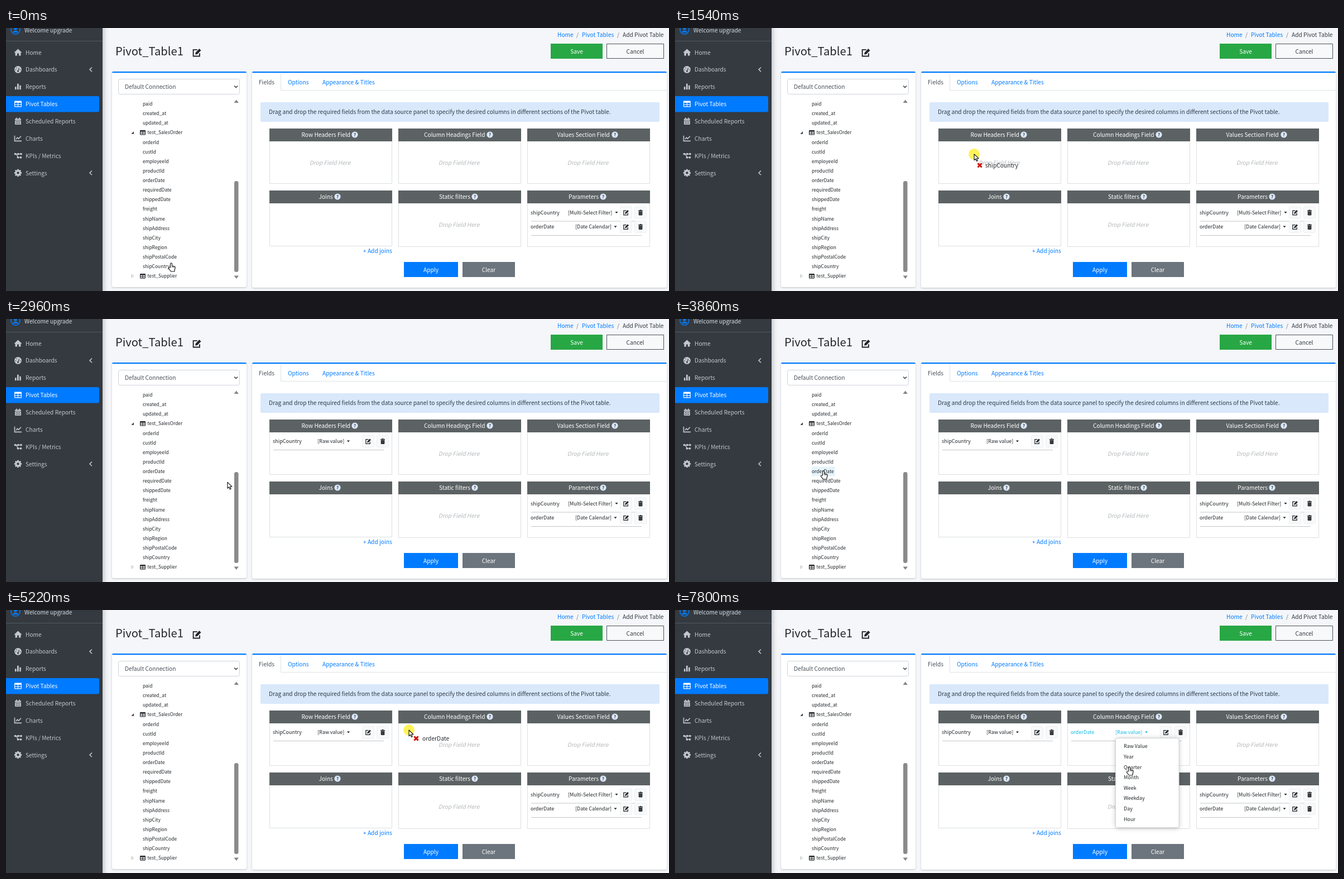
Recreate the animation shown at these times as an HTML page with a canvas. Size 1188x471 px, loop 8 s.

```html
<!DOCTYPE html>
<html lang="en">
<head>
<meta charset="utf-8">
<title>Pivot table builder</title>
<style>
html, body { margin: 0; width: 100%; height: 100%; overflow: hidden; background: #f4f6f9; }
canvas { display: block; }
</style>
</head>
<body>
<canvas id="stage" width="1188" height="471"></canvas>
<script>
const ctx = document.getElementById('stage').getContext('2d');
const LOOP = 8000;
const FAMILY = '"Noto Sans CJK SC", "Noto Sans CJK JP", "Noto Sans CJK", "Noto Sans", sans-serif';
const BODY = 10.18, SMALL = 8.95, TREE = 8.45;
const BLUE = '#007bff', INK = '#212529', CYAN = '#17b8e0';

// Pointer path: time, x, y of the tip
const PATH = [
  [0, 296, 421], [50, 296, 421], [210, 290, 428], [500, 290, 426], [1340, 524, 242],
  [1540, 536, 226], [1680, 546, 217], [1900, 546, 217], [2290, 554, 231], [2700, 463, 285],
  [3440, 312, 291], [3530, 312, 291], [3860, 266, 272], [4010, 266, 272], [4800, 688, 225],
  [5220, 722, 215], [5370, 722, 215], [6190, 842, 224], [6390, 844, 223], [7200, 844, 223],
  [7800, 814, 281], [8000, 814, 281]
];
const DRAGS = [
  { from: 550, to: 1950, name: 'shipCountry', icon: [10, 20], label: [20, 20] },
  { from: 4060, to: 5420, name: 'orderDate', icon: [13, 15], label: [24, 15] }
];
const CLICK = 6660, MENU_OPEN = 6785;
const TREE_ROWS = ['paid', 'created_at', 'updated_at', '>test_SalesOrder', 'orderId', 'custId',
  'employeeId', 'productId', 'orderDate', 'requiredDate', 'shippedDate', 'freight', 'shipName',
  'shipAddress', 'shipCity', 'shipRegion', 'shipPostalCode', 'shipCountry', '>test_Supplier'];
const treeY = i => 136 + i * 17.12;

function rect(x, y, w, h, fill, stroke, r = 0) {
  ctx.beginPath();
  ctx.roundRect(x, y, w, h, r);
  if (fill) { ctx.fillStyle = fill; ctx.fill(); }
  if (stroke) { ctx.strokeStyle = stroke; ctx.lineWidth = 1; ctx.stroke(); }
}
function line(color, width, ...pts) {
  ctx.beginPath();
  pts.forEach(([x, y]) => ctx.lineTo(x, y));
  ctx.strokeStyle = color;
  ctx.lineWidth = width;
  ctx.stroke();
}
function poly(color, ...pts) {
  ctx.beginPath();
  pts.forEach(([x, y]) => ctx.lineTo(x, y));
  ctx.closePath();
  ctx.fillStyle = color;
  ctx.fill();
}
function disc(x, y, r, fill) {
  ctx.beginPath();
  ctx.arc(x, y, r, 0, 7);
  ctx.fillStyle = fill;
  ctx.fill();
}
function ring(x, y, r, color, width) {
  ctx.beginPath();
  ctx.arc(x, y, r, 0, 7);
  ctx.strokeStyle = color;
  ctx.lineWidth = width;
  ctx.stroke();
}
// y is the middle of the capitals
function text(str, x, y, color = INK, size = BODY, align = 'left', style = '') {
  ctx.font = `${style} ${size}px ${FAMILY}`;
  ctx.textAlign = align;
  ctx.fillStyle = color;
  ctx.fillText(str, x, y + size * 0.37);
}
function at(x, y, scale, draw) {
  ctx.save();
  ctx.translate(x, y);
  ctx.scale(scale, scale);
  draw();
  ctx.restore();
}
function withShadow(blur, alpha, draw) {
  ctx.save();
  ctx.shadowColor = `rgba(0,0,0,${alpha})`;
  ctx.shadowBlur = blur;
  ctx.shadowOffsetY = 1;
  draw();
  ctx.restore();
}

function editIcon(x, y, s = 1) {
  at(x, y, s, () => {
    line(INK, 1.3, [0.5, -3.5], [-4.4, -3.5], [-4.4, 4.5], [3.4, 4.5], [3.4, 0.8]);
    poly(INK, [-2, 2.4], [-1.6, 0], [3, -4.8], [5.2, -2.6], [0.5, 2]);
  });
}
function trashIcon(x, y) {
  rect(x - 4, y - 4, 8, 1.4, INK);
  rect(x - 1.5, y - 5, 3, 1.4, INK);
  rect(x - 3.3, y - 2, 6.6, 7, INK, null, [0, 0, 1, 1]);
  for (const dx of [-1.5, 0, 1.5]) line('#777', 0.5, [x + dx, y - 1], [x + dx, y + 4]);
}
function tableIcon(x, y, w, h, color, hole) {
  rect(x - w / 2, y - h / 2, w, h, color, null, 1);
  const cw = w / 2 - 1.6, ch = h / 3 - 1;
  for (const cx of [x - w / 2 + 1.1, x + 0.5])
    for (const cy of [y - h / 2 + h * 0.3, y - h / 2 + h * 0.64]) rect(cx, cy, cw, ch, hole);
}
function caret(x, y, color) {
  poly(color, [x - 2.6, y - 1.4], [x + 2.6, y - 1.4], [x, y + 1.5]);
}

const navIcons = [
  c => { poly(c, [-7, 0.6], [0, -6], [7, 0.6], [5, 0.8], [5, 6], [1.5, 6], [1.5, 2], [-1.5, 2], [-1.5, 6], [-5, 6], [-5, 0.8]); },
  c => {
    disc(0, 0, 6.4, c);
    line('#343a40', 1.2, [0, 2.5], [2.2, -3]);
    disc(0, 3, 1.5, '#343a40');
    [[-4, 0.5], [-2.6, -3], [4, 0.5]].forEach(([x, y]) => disc(x, y, 0.8, '#343a40'));
  },
  c => { rect(-5.5, 0, 2.6, 5, c); rect(-1.5, -5.5, 2.8, 10.5, c); rect(2.7, -2.5, 2.6, 7.5, c); },
  c => tableIcon(0, 0, 13, 11, c, BLUE),
  c => {
    rect(-5.5, -4.5, 11, 2.4, c);
    rect(-3.5, -6.3, 1.7, 2.5, c);
    rect(1.8, -6.3, 1.7, 2.5, c);
    rect(-5.5, -1.3, 11, 7.5, c, null, 1);
    for (const x of [-3.8, -0.8, 2.2]) for (const y of [0.2, 3.1]) rect(x, y, 1.6, 1.6, '#343a40');
  },
  c => { line(c, 1.6, [-6, -5], [-6, 4.6], [6.5, 4.6]); line(c, 1.6, [-3.5, 1.5], [-1, -1.5], [1, 0.5], [5.5, -4]); },
  c => {
    line(c, 1.3, [-6, -3], [6, -3]);
    line(c, 1.3, [-3, -3], [0, 3], [5, 3]);
    [[-5, -3], [0.5, -3], [5.5, -3], [0, 3.2], [5, 3.2]].forEach(([x, y]) => disc(x, y, 1.9, c));
  },
  c => {
    for (let i = 0; i < 8; i++) {
      const a = i * Math.PI / 4;
      line(c, 3, [0, 0], [6.6 * Math.cos(a), 6.6 * Math.sin(a)]);
    }
    disc(0, 0, 5, c);
    disc(0, 0, 2.1, '#343a40');
  }
];

function sidebar() {
  withShadow(10, 0.35, () => rect(0, -10, 173, 500, '#343a40'));
  ring(17, 3, 8, BLUE, 1.5);
  disc(17, 1, 2.8, BLUE);
  ctx.beginPath();
  ctx.ellipse(17, 8, 5, 3.2, 0, Math.PI, 0);
  ctx.fillStyle = BLUE;
  ctx.fill();
  text('Welcome upgrade', 33, 4, '#d3d8e0');
  line('#4f5962', 1, [0, 23.5], [173, 23.5]);
  rect(0, 122, 167, 28.5, BLUE, null, [0, 3, 3, 0]);
  ['Home', 'Dashboards', 'Reports', 'Pivot Tables', 'Scheduled Reports', 'Charts', 'KPIs / Metrics', 'Settings']
    .forEach((name, i) => {
      const y = 43.5 + i * 30.85, color = i === 3 ? '#fff' : '#c2c7d0';
      at(21.5, y, 1, () => navIcons[i](color));
      text(name, 35, y + 0.3, color);
      if (i === 1 || i === 7) line(color, 1.5, [154, y - 3.8], [150, y], [154, y + 3.8]);
    });
}

function topBar() {
  text('Home', 988, 12, BLUE);
  text('/', 1022, 12, '#6c757d');
  text('Pivot Tables', 1032, 12, BLUE);
  text('/', 1095, 12, '#6c757d');
  text('Add Pivot Table', 1105, 12, '#343a40');
  text('Pivot_Table1', 196, 42, INK, 20.2);
  editIcon(342, 44, 1.45);
  button('Save', 976, 28, 93, '#28a745');
  rect(1076.5, 28.5, 102, 26, '#f8f9fb', '#4b5056');
  text('Cancel', 1127.5, 42, '#343a40', BODY, 'center');
}
function button(label, x, y, w, fill) {
  rect(x, y, w, 27, fill);
  text(label, x + w / 2, y + 14, '#fff', BODY, 'center');
}
function card(x, y, w, h) {
  withShadow(3, 0.22, () => rect(x, y, w, h, '#fff', null, 3));
  rect(x, y, w, 2.2, BLUE, null, [3, 3, 0, 0]);
}

function treePanel(hover) {
  card(190, 78, 241, 386);
  rect(201.5, 91.5, 217, 27, '#fff', '#ced4da', 3);
  text('Default Connection', 213, 105, '#495057');
  line('#343a40', 1.5, [409, 103.5], [412, 106.5], [415, 103.5]);
  TREE_ROWS.forEach((row, i) => {
    const y = treeY(i);
    if (row[0] !== '>') {
      if (i === hover) rect(245, y - 8.5, treeWidth(row) + 2, 17, '#e5f3fa');
      text(row, 245, y, INK, TREE);
      return;
    }
    if (i < 10) poly('#333', [224.5, y + 2.5], [229, y + 2.5], [229, y - 2]);
    else line('#aaa', 0.8, [225, y - 2.6], [228.5, y], [225, y + 2.6], [225, y - 2.6]);
    tableIcon(245, y, 10, 8.5, INK, '#fff');
    text(row.slice(1), 253.5, y, INK, TREE);
  });
  poly('#858585', [408.5, 134], [417, 134], [412.7, 128.5]);
  poly('#858585', [408.5, 443.5], [417, 443.5], [412.7, 449]);
  rect(409, 274, 7.5, 163, '#8a8a8a', null, 3.5);
}
function treeWidth(row) {
  ctx.font = `${TREE}px ${FAMILY}`;
  return ctx.measureText(row).width;
}
function treeItemAt({ x, y }) {
  const i = Math.round((y - treeY(0)) / 17.12), row = TREE_ROWS[i];
  return row && row[0] !== '>' && x >= 245 && x <= 246 + treeWidth(row) ? i : -1;
}

function fieldBox(x, y, h, title, titleX, helpX, empty) {
  rect(x + 0.5, y + 0.5, 219, h, '#fff', '#dcdfe1');
  rect(x, y, 220, 23, '#5c6264');
  text(title, titleX, y + 11, '#fff');
  disc(helpX, y + 11, 5.6, '#dbe8fb');
  text('?', helpX, y + 11, '#343a40', 8, 'center', 'bold');
  if (empty) text('Drop Field Here', x + 108.5, y + 61.5, '#b4b7ba', BODY, 'center', 'italic');
}
function fieldRow(x, y, name, value, valueX, caretX, color = INK) {
  text(name, x + 6, y, color, 9.02);
  text(value, x + valueX, y, color, SMALL);
  caret(x + caretX, y, color);
  for (const dx of [177, 203]) rect(x + dx - 10.5, y - 10.5, 21, 21, '#f8f9fa', '#eceef0', 2);
  editIcon(x + 177, y, 0.95);
  trashIcon(x + 203, y);
  line('#c4c6c8', 1, [x + 7, y + 15.5], [x + 205, y + 15.5]);
}

function fieldsPanel(t, rows) {
  card(441, 78, 743, 387);
  line('#dee2e6', 1, [492.5, 82], [492.5, 111.5], [1184, 111.5]);
  text('Fields', 453, 97, '#495057');
  text('Options', 505, 97, BLUE);
  text('Appearance & Titles', 567, 97, BLUE);
  rect(456, 133, 715, 35, '#d9e8fb', null, 2);
  text('Drag and drop the required fields from the data source panel to specify the desired columns in different sections of the Pivot table.', 471, 150, '#2f3a48');
  fieldBox(472, 180, 98, 'Row Headers Field', 529.5, 625, !rows[0].shown);
  fieldBox(703, 180, 98, 'Column Headings Field', 749, 867, !rows[1].shown);
  fieldBox(934, 180, 98, 'Values Section Field', 987.5, 1091, true);
  fieldBox(472, 291, 99, 'Joins', 560.5, 594, false);
  fieldBox(703, 291, 100, 'Static filters', 776, 840, true);
  fieldBox(934, 291, 100, 'Parameters', 1008, 1070, false);
  fieldRow(934, 330.5, 'shipCountry', '[Multi-Select Filter]', 73, 160);
  fieldRow(934, 356, 'orderDate', '[Date Calendar]', 86, 158);
  for (const r of rows)
    if (r.shown) fieldRow(r.x, 219, r.name, '[Raw value]', 86, 141.5, r.hover ? CYAN : INK);
  text('+ Add joins', 640, 399.5, BLUE);
  button('Apply', 713, 419, 97, BLUE);
  button('Clear', 818, 419, 94, '#6c757d');
}

function tooltip(r) {
  const cx = r.x + 43.5;
  ctx.font = `${SMALL}px ${FAMILY}`;
  const w = ctx.measureText(r.name).width + 12;
  rect(cx - w / 2, 186.5, w, 21.5, '#0b0b0b', null, 3);
  poly('#0b0b0b', [cx - 4, 208], [cx + 4, 208], [cx, 212]);
  text(r.name, cx, 197, '#fff', SMALL, 'center');
}
function menu() {
  withShadow(8, 0.25, () => rect(789.5, 229.5, 113.5, 160, '#fff', null, 3));
  rect(789.5, 229.5, 113.5, 160, '#fff', '#cfd1d3', 3);
  ['Raw Value', 'Year', 'Quarter', 'Month', 'Week', 'Weekday', 'Day', 'Hour']
    .forEach((item, i) => text(item, 804, 244 + i * 18.6, INK, SMALL));
}

const HAND = new Path2D('M-1.5 8V1Q0-1 1.5 1V5L6 6Q7.5 6.5 7.2 8.5L6 12.5V15H-0.5L-4.5 9.8Q-5 8-3.2 8Z');
const ARROW = new Path2D('M0 0V10.8L2.6 8.5 4.4 12.6 6.2 11.8 4.5 7.8H8Z');
function pointer({ x, y }, shape) {
  at(x, y, 1, () => {
    ctx.lineJoin = 'round';
    ctx.lineWidth = 1.1;
    ctx.fillStyle = '#fff';
    ctx.strokeStyle = '#111';
    ctx.fill(shape);
    ctx.stroke(shape);
    if (shape === HAND) for (const fx of [1.5, 3.5, 5.3]) line('#111', 0.7, [fx, 5.5], [fx, 8]);
  });
}
function dragGhost(p, d) {
  const x = p.x + d.icon[0], y = p.y + d.icon[1];
  line('#d01712', 3, [x - 3.6, y - 3.6], [x + 3.6, y + 3.6]);
  line('#d01712', 3, [x + 3.6, y - 3.6], [x - 3.6, y + 3.6]);
  text(d.name, p.x + d.label[0], p.y + d.label[1], '#26292c', 10.25);
}

// Hermite curve through the path, at rest wherever two neighbours coincide
function tip(t) {
  let i = 0;
  while (i < PATH.length - 2 && t >= PATH[i + 1][0]) i++;
  const a = PATH[i], b = PATH[i + 1], span = b[0] - a[0], u = (t - a[0]) / span;
  const still = (p, q) => p[1] === q[1] && p[2] === q[2];
  const speed = (k, axis) => {
    const p = PATH[k - 1], q = PATH[k], r = PATH[k + 1];
    return !p || !r || still(p, q) || still(q, r) ? 0 : (r[axis] - p[axis]) / (r[0] - p[0]);
  };
  const mix = axis => {
    const s = u * u * (3 - 2 * u);
    return a[axis] + (b[axis] - a[axis]) * s +
      span * (speed(i, axis) * u * (1 - u) ** 2 - speed(i + 1, axis) * u * u * (1 - u));
  };
  return { x: mix(1), y: mix(2) };
}

function render(t) {
  const p = tip(t);
  const drag = DRAGS.find(d => t >= d.from && t < d.to);
  const menuOpen = t >= MENU_OPEN;
  const rows = [472, 703].map((x, i) => {
    const shown = t >= DRAGS[i].to;
    const over = shown && p.x >= x && p.x <= x + 206 && p.y >= 206 && p.y <= 234;
    return { x, name: DRAGS[i].name, shown, over, hover: over || (i === 1 && menuOpen) };
  });
  const item = drag ? -1 : treeItemAt(p);

  rect(0, 0, 1188, 471, '#f4f6f9');
  topBar();
  treePanel(item);
  fieldsPanel(t, rows);
  sidebar();
  const named = rows.find(r => r.over && !drag && p.x < r.x + 84 && t >= DRAGS[rows.indexOf(r)].to + 70);
  if (named) tooltip(named);
  if (menuOpen) menu();
  if (drag || (t >= CLICK && t < MENU_OPEN)) disc(p.x, p.y, 10, 'rgba(255,240,50,0.8)');
  if (drag) dragGhost(p, drag);
  const clickable = t < DRAGS[0].from || item >= 0 || menuOpen || rows.some(r => r.over);
  pointer(p, !drag && clickable ? HAND : ARROW);
}

function tick(now) {
  render(now % LOOP);
  requestAnimationFrame(tick);
}
requestAnimationFrame(tick);
</script>
</body>
</html>
```
